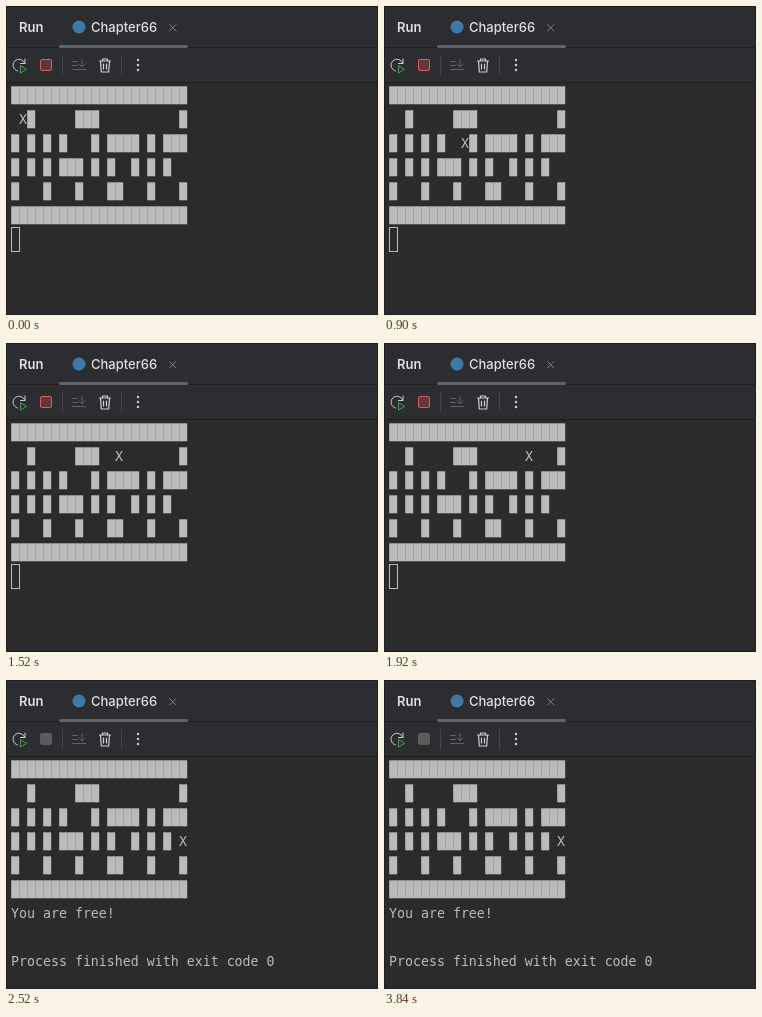
Recreate the animation shown at these times as an HTML page. Size 372 by 309 pixels, loop 4.24 s.

```html
<!DOCTYPE html>
<html lang="en">
<head>
<meta charset="utf-8">
<title>Maze run</title>
<style>
  html, body { margin: 0; width: 100%; height: 100%; overflow: hidden; background: #2b2b2b; }
  svg { display: block; width: 372px; height: 309px; }
  .ui { font: 500 13px Inter, sans-serif; fill: #dfe1e5; }
  .title { font-weight: 600; }
  .mono { font: 13.288px "DejaVu Sans Mono", "Noto Sans Mono", monospace; fill: #bbb; white-space: pre; }
  .line { fill: none; stroke: #ced0d6; stroke-linecap: round; stroke-linejoin: round; }
  .dim { stroke: #5f6268; }
  .close { stroke: #7d8087; }
</style>
</head>
<body>
<svg viewBox="0 0 372 309">
  <rect width="372" height="309" fill="#2b2b2b"/>
  <rect width="372" height="76" fill="#2b2d30"/>
  <path d="M0 41.5H372M0 76.5H372" stroke="#1e1f22"/>
  <rect x=".5" y=".5" width="371" height="308" fill="none" stroke="#1e1f22"/>

  <text class="ui title" x="13" y="26">Run</text>
  <circle cx="73" cy="21" r="6.5" fill="#3f79a8"/>
  <text class="ui" x="85" y="26">Chapter66</text>
  <path class="line close" d="M163.5 18.5l6.5 6.5m0-6.5l-6.5 6.5"/>
  <rect x="53" y="39" width="129" height="3" rx="1.5" fill="#5f6268"/>

  <path class="line" d="M11.5 65A6 6 0 1 1 18.8 57.5M19 53v4.5h-4.5"/>
  <path d="M14.5 59.5l6 3.8-6 3.8z" fill="#253627" stroke="#57965c" stroke-linejoin="round"/>
  <rect id="stop" x="34.5" y="53.5" width="11" height="11" rx="1.5"/>
  <path d="M56.5 49V69M115.5 49V69" stroke="#43454a"/>
  <path class="line dim" d="M66.5 55.5h5M66.5 59.5h5M66.5 63.5h13M76 53.5v7M73 58l3 3 3-3"/>
  <path class="line" stroke-width="1.2" d="M93.5 55h11M96.5 55v-2h5v2M94.5 55l.8 11h7.4l.8-11M97.5 58v5M100.5 58v5"/>
  <g fill="#ced0d6">
    <circle cx="132" cy="54" r="1.2"/><circle cx="132" cy="59" r="1.2"/><circle cx="132" cy="64" r="1.2"/>
  </g>

  <g id="walls" fill="#bbb"></g>
  <text id="player" class="mono">X</text>
  <rect id="caret" x="5.5" y="221.5" width="8" height="24" fill="none" stroke="#bbb"/>
  <g id="ending" class="mono">
    <text x="5" y="238">You are free!</text>
    <text x="5" y="286">Process finished with exit code 0</text>
  </g>
</svg>
<script>
const LOOP = 4240, CELL = 8, ROW = 24, LEFT = 5;
const maze = [
  "######################",
  "  #     ###          #",
  "# # # #   # #### # ###",
  "# # # ### # #  # # #  ",
  "#   #   #   ##   #   #",
  "######################"
];
const moves = "DDDRRUUURRRRDRRDDRRUUURRRRRRRDDDRRUR";
// [step, ms]: steps between two entries are evenly spaced
const pace = [[1, 20], [9, 520], [10, 580], [15, 900], [16, 1020], [17, 1040], [18, 1140],
  [24, 1520], [25, 1640], [26, 1700], [27, 1840], [32, 2220], [33, 2320], [34, 2340],
  [35, 2460], [36, 2520]];

const $ = id => document.getElementById(id);

// Separate blocks on fractional positions leave faint seams between neighbours
function addBlock(c, r) {
  const block = document.createElementNS("http://www.w3.org/2000/svg", "rect");
  const box = { x: LEFT + c * CELL + .2, y: 80.3 + r * ROW, width: CELL, height: 18 };
  for (const key in box) block.setAttribute(key, box[key]);
  $("walls").append(block);
}
maze.forEach((line, r) => [...line].forEach((ch, c) => ch === "#" && addBlock(c, r)));

const path = [[1, 1]];
for (const m of moves) {
  const [c, r] = path[path.length - 1];
  path.push([c + (m === "R"), r + (m === "D") - (m === "U")]);
}

function stepAt(t) {
  if (t < pace[0][1]) return 0;
  for (let i = 1; i < pace.length; i++) {
    const [s0, t0] = pace[i - 1], [s1, t1] = pace[i];
    if (t < t1) return s0 + Math.floor((t - t0) / (t1 - t0) * (s1 - s0));
  }
  return moves.length;
}

function draw(t) {
  const step = stepAt(t), done = step === moves.length;
  const [c, r] = path[step];
  $("player").setAttribute("x", LEFT + c * CELL);
  $("player").setAttribute("y", 94 + r * ROW);
  $("caret").style.display = done ? "none" : "";
  $("ending").style.display = done ? "" : "none";
  $("stop").setAttribute("fill", done ? "#5b5b5b" : "#5e3838");
  $("stop").setAttribute("stroke", done ? "#5b5b5b" : "#db5c5c");
}

const start = performance.now();
function tick() {
  draw((performance.now() - start) % LOOP);
  requestAnimationFrame(tick);
}
tick();
</script>
</body>
</html>
```
